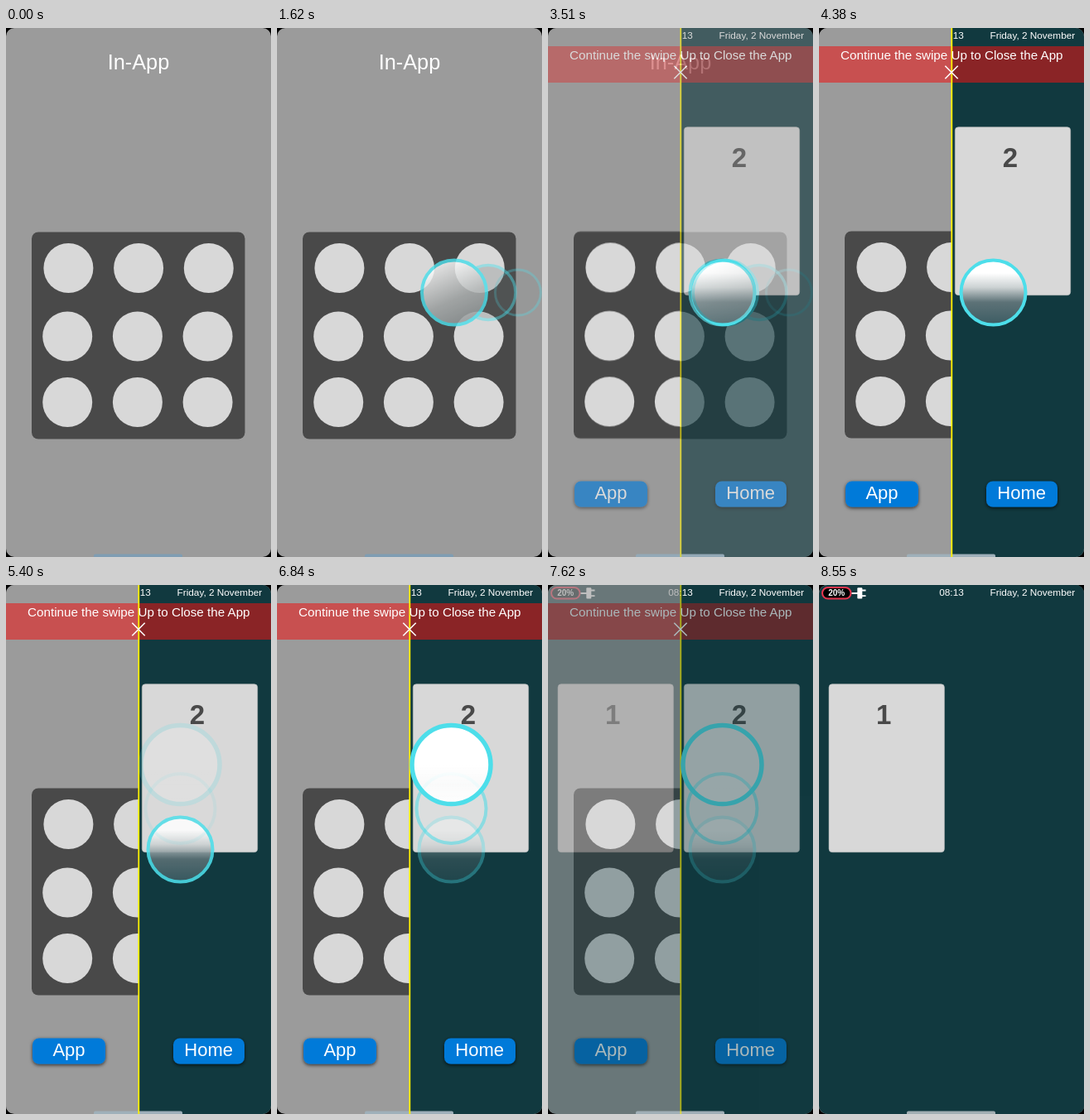
An HTML page that plays this animation: 320x639 px, repeating every 8.73 s.

```html
<!DOCTYPE html>
<html lang="en">
<head>
<meta charset="utf-8">
<title>Split view gestures</title>
<style>
  html, body { margin: 0; width: 100%; height: 100%; overflow: hidden; background: #000; }
  svg { display: block; width: 100vw; height: 100vh; }
  text { font-family: "Liberation Sans", Arial, sans-serif; fill: #fff; }
  .middle { text-anchor: middle; }
  .card { fill: #d8d8d8; stroke: #bcc0c0; stroke-width: .6; }
  .number { font-size: 33px; font-weight: bold; fill: #494949; text-anchor: middle; }
  .status { font-size: 11.8px; }
  .label { font-size: 22px; text-anchor: middle; }
  .ring { fill: none; stroke: #4ddeea; }

  .anim { animation: 8730ms linear infinite both; }
  .swipe { animation-name: swipe; }
  .split { animation-name: split; }
  .start { animation-name: start; }
  .second { animation-name: second; }
  .third { animation-name: third; }
  .glow { animation-name: glow; }
  .home { animation-name: home; }
  .charge { animation-name: charge; }

  @keyframes swipe { 0%, 12.26% { opacity: 0 } 19.82%, 100% { opacity: 1 } }
  @keyframes split { 0%, 35.4% { opacity: 0 } 42.96%, 100% { opacity: 1 } }
  @keyframes start { 0%, 60.48% { opacity: 1 } 68.04%, 100% { opacity: .36 } }
  @keyframes second { 0%, 60.48% { opacity: 0 } 68.04%, 100% { opacity: .55 } }
  @keyframes third { 0%, 60.48% { opacity: 0 } 68.04%, 100% { opacity: 1 } }
  @keyframes glow { 0%, 83.6% { opacity: 1 } 86.25%, 100% { opacity: .2 } }
  @keyframes home { 0%, 84.6% { opacity: 0 } 92.15%, 100% { opacity: 1 } }
  @keyframes charge { 0%, 95.88% { fill: #0a1a1d } 97.94%, 100% { fill: #000 } }
</style>
</head>
<body>
<svg viewBox="0 0 320 639" preserveAspectRatio="none">
  <defs>
    <clipPath id="screen"><rect width="320" height="639" rx="10"/></clipPath>
    <clipPath id="leftHalf"><rect width="160" height="639"/></clipPath>
    <clipPath id="rightHalf"><rect x="160" width="160" height="639"/></clipPath>

    <linearGradient id="silver" x1=".2" y1="0" x2=".65" y2="1">
      <stop offset=".1" stop-color="#fff"/>
      <stop offset=".62" stop-color="#b2b6b6"/>
      <stop offset="1" stop-color="#929899"/>
    </linearGradient>
    <linearGradient id="fade" x2="0" y2="1">
      <stop offset=".2" stop-color="#fff"/>
      <stop offset=".42" stop-color="#ccd2d3"/>
      <stop offset=".65" stop-color="#5d7277"/>
      <stop offset="1" stop-color="#3c5c63"/>
    </linearGradient>
    <linearGradient id="white" x2="0" y2="1">
      <stop offset=".5" stop-color="#fff"/>
      <stop offset=".75" stop-color="#fff" stop-opacity=".85"/>
      <stop offset="1" stop-color="#fff" stop-opacity=".95"/>
    </linearGradient>
    <filter id="shadow" x="-20%" y="-30%" width="140%" height="170%">
      <feDropShadow dx="0" dy="1.5" stdDeviation="2" flood-opacity=".7"/>
    </filter>

    <g id="row" fill="#d8d8d8">
      <circle cx="74.2" r="30"/><circle cx="158.9" r="30"/><circle cx="243.6" r="30"/>
    </g>
    <g id="app">
      <rect width="320" height="639" fill="#9b9b9b"/>
      <rect x="31" y="246.5" width="257.5" height="250" rx="8" fill="#494949"/>
      <use href="#row" x="1.2" y="290"/>
      <use href="#row" y="372.5"/>
      <use href="#row" y="452"/>
    </g>
    <g id="desktop">
      <rect width="320" height="639" fill="#11393f"/>
      <text class="status middle" x="160" y="13.2">08:13</text>
      <text class="status" x="206.5" y="13.2">Friday, 2 November</text>
    </g>
    <rect id="card" class="card" x="12" y="119.7" width="139.4" height="203" rx="4"/>
    <rect id="bar" x="106" y="635.5" width="107" height="5" rx="2"/>
  </defs>

  <g clip-path="url(#screen)">
    <use href="#app"/>
    <use href="#bar" fill="#7f9db3"/>
    <text class="middle" x="160" y="50" font-size="25.3">In-App</text>

    <g class="anim swipe">
      <g opacity=".36">
        <circle cx="291" cy="319.5" r="27.5" fill="#707777" fill-opacity=".3"/>
        <circle class="ring" cx="291" cy="319.5" r="27.5" stroke-width="3"/>
      </g>
      <g opacity=".55">
        <circle cx="255" cy="319.5" r="33" fill="#606868" fill-opacity=".5"/>
        <circle class="ring" cx="255" cy="319.5" r="33" stroke-width="3.5"/>
      </g>
      <circle class="ring" cx="214" cy="319.5" r="39" stroke-width="4" style="fill:url(#silver)"/>
    </g>

    <g class="anim split">
      <g clip-path="url(#leftHalf)"><use href="#app" y="-1"/></g>
      <g clip-path="url(#rightHalf)">
        <use href="#desktop"/>
        <use href="#card" x="152.3"/>
        <text class="number" x="231" y="168">2</text>
      </g>
      <use href="#bar" fill="#9fb0ba"/>
      <rect y="22" width="320" height="44" fill="#ed1313" fill-opacity=".55"/>
      <path d="M160.3 0V639" stroke="#fff200" stroke-width="1.8"/>
      <text class="middle" x="160.3" y="37.5" font-size="15.2">Continue the swipe Up to Close the App</text>
      <path d="M152.3 45.8l15.4 15.4m0-15.4l-15.4 15.4" stroke="#fff" stroke-width="1.6"/>

      <g filter="url(#shadow)" fill="#007ad9">
        <rect x="32" y="547.5" width="88" height="31" rx="8"/>
        <rect x="202" y="547.5" width="86" height="31" rx="8"/>
      </g>
      <text class="label" x="76" y="569.3">App</text>
      <text class="label" x="244.7" y="569.3">Home</text>

      <g class="anim start">
        <circle class="ring" cx="210.5" cy="319.5" r="39" stroke-width="4" style="fill:url(#fade)"/>
      </g>
      <g class="anim second">
        <circle cx="210.5" cy="270" r="42" fill="#e8ecec" fill-opacity=".55"/>
        <circle class="ring" cx="210.5" cy="270" r="42" stroke-width="4"/>
      </g>
      <g class="anim third">
        <circle class="anim glow" cx="210.5" cy="217" r="47.5" fill="url(#white)"/>
        <circle class="ring" cx="210.5" cy="217" r="47.5" stroke-width="5.5"/>
      </g>
    </g>

    <g class="anim home">
      <use href="#desktop"/>
      <use href="#card"/>
      <text class="number" x="78.3" y="168">1</text>
      <rect class="anim charge" x="4" y="3" width="34.5" height="13.6" rx="6.8" stroke="#e8364f" stroke-width="2"/>
      <text class="middle" x="21.2" y="13.4" font-size="10" font-weight="bold">20%</text>
      <path d="M39.5 10H47M52 6.5h4.5M52 13.2h4.5" stroke="#fff" stroke-width="1.8"/>
      <rect x="46.3" y="3.3" width="6" height="13.2" rx="1" fill="#fff"/>
      <use href="#bar" fill="#a3afb3"/>
    </g>
  </g>
</svg>
</body>
</html>
```
